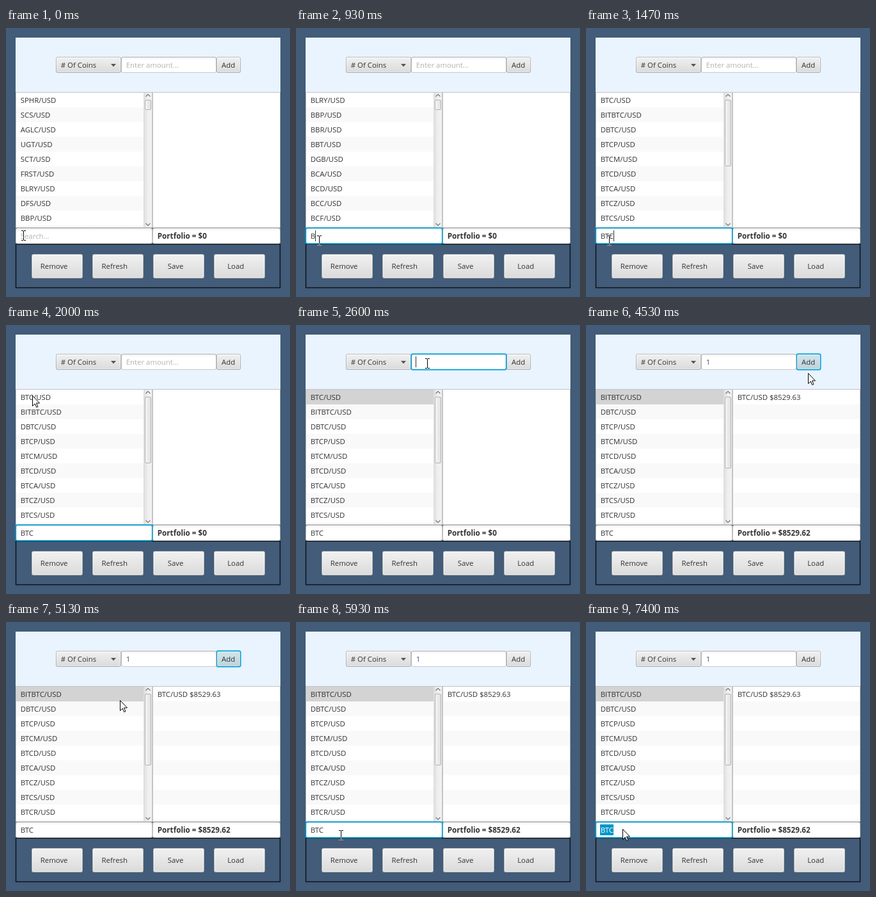
An HTML page with a canvas that plays this animation: 444 px wide and 420 px high, repeating every 8000 ms.

```html
<!DOCTYPE html>
<html lang="en">
<head>
<meta charset="utf-8">
<title>Coin portfolio</title>
<style>
  html, body { margin: 0; width: 100%; height: 100%; overflow: hidden; background: #425c79; }
  canvas { display: block; }
</style>
</head>
<body>
<canvas id="stage" width="444" height="420"></canvas>
<script>
const ctx = document.getElementById('stage').getContext('2d', { alpha: false });
const LOOP = 8000;
const TICKS_PER_MS = 0.015;
const ROW = 23;
const INK = '#333', BLUE = '#039ed3', SELECTED = '#0096c9', FAINT_BLUE = 'rgba(3,158,211,.13)';
const REGULAR = '11.4px "Open Sans", sans-serif';
const BOLD = 'bold 11.7px "Open Sans", sans-serif';

const SEARCH = [15, 312, 214, 25];
const AMOUNT = [180, 45, 149, 25];
const ADD = [329, 45, 38, 25];
const LIST = [15, 100, 214, 212];

// Coin lists by the tick at which they appear, with the scroll thumb height.
const LISTS = [
  [0, 16, 'SPHR SCS AGLC UGT SCT FRST BLRY DFS BBP'],
  [14, 16, 'BLRY BBP BBR BBT DGB BCA BCD BCC BCF'],
  [18, 34, 'BBT BTA BTB BTC BITBTC DBTC BTCP BTCM BTCD'],
  [22, 104, 'BTC BITBTC DBTC BTCP BTCM BTCD BTCA BTCZ BTCS'],
  [68, 112, 'BITBTC DBTC BTCP BTCM BTCD BTCA BTCZ BTCS BTCR'],
];
const QUERY = [[0, ''], [13, 'B'], [18, 'BT'], [22, 'BTC']];
const FOCUS = [[0, ''], [5, 'search'], [32, 'list'], [39, 'amount'], [52, 'add'], [84, 'search']];
const CARET = [[6, 29], [39, 52], [84, 89]];

// Pointer path: tick, x, y.
const PATH = [
  [0, 27, 324], [1, 36, 332], [22, 36, 332], [29, 41, 111], [30, 41, 110], [32, 42, 112],
  [34, 100, 79], [39, 205, 60], [44, 215, 61], [47, 354, 72], [48, 357, 79], [50, 357, 63],
  [51, 357, 61], [55, 357, 61], [61, 347, 75], [68, 347, 75], [77, 178, 122], [80, 138, 232],
  [84, 73, 329], [89, 70, 333], [91, 70, 333], [95, 27, 330], [104, 27, 330],
  [106, 5, 326], [108, 3, 325], [111, 57, 323],
];

const latest = (steps, tick) => steps.filter(step => step[0] <= tick).pop();
const inside = ([x, y, w, h], px, py) => px >= x && px < x + w && py >= y && py < y + h;

function pointerAt(tick) {
  const next = PATH.findIndex(key => key[0] > tick);
  if (next < 0) return PATH[PATH.length - 1].slice(1);
  const [t0, x0, y0] = PATH[next - 1], [t1, x1, y1] = PATH[next];
  const k = (tick - t0) / (t1 - t0);
  return [Math.round(x0 + (x1 - x0) * k), Math.round(y0 + (y1 - y0) * k)];
}

function rect(x, y, w, h, fill) {
  ctx.fillStyle = fill;
  ctx.fillRect(x, y, w, h);
}

function rounded([x, y, w, h], inset, radius, fill) {
  ctx.fillStyle = fill;
  ctx.beginPath();
  ctx.roundRect(x + inset, y + inset, w - 2 * inset, h - 2 * inset, radius);
  ctx.fill();
}

function shade(x0, y0, x1, y1, ...colors) {
  const gradient = ctx.createLinearGradient(x0, y0, x1, y1);
  colors.forEach((color, i) => gradient.addColorStop(i / (colors.length - 1), color));
  return gradient;
}

function text(label, x, y, color = INK, font = REGULAR) {
  ctx.font = font;
  ctx.fillStyle = color;
  ctx.fillText(label, x, y);
}

function line(points, color) {
  ctx.strokeStyle = color;
  ctx.lineWidth = 1.2;
  ctx.beginPath();
  points.forEach(([x, y]) => ctx.lineTo(x, y));
  ctx.stroke();
}

function button(box, focused, top = '#f1f1f1', bottom = '#dadada') {
  const [, y, , h] = box;
  rounded(box, focused ? -0.4 : 0, 3, focused ? BLUE : shade(0, y, 0, y + h, '#bdbdbd', '#a9a9a9'));
  rounded(box, 1, 2, shade(0, y, 0, y + h, '#fdfdfd', '#e9e9e9'));
  rounded(box, 2, 2, shade(0, y, 0, y + h, top, bottom));
  if (focused) rounded(box, -1.4, 4, FAINT_BLUE);
}

function field(box, focused) {
  const [x, y, w, h] = box;
  rounded(box, focused ? -0.4 : 0, 3, focused ? BLUE : shade(0, y, 0, y + h, '#b5b5b5', '#c8c8c8'));
  rounded(box, 1, 2, shade(0, y, 0, y + 5, '#ededed', '#fff'));
  if (focused) {
    rounded(box, -1.4, 4, FAINT_BLUE);
    rounded([x, y, w, h], 2, 1, '#fff');
  }
}

function input(box, value, prompt, focused, caretOn, selected, color) {
  const [x, y] = box, left = x + 7.7, baseline = y + 17;
  field(box, focused);
  ctx.font = REGULAR;
  const width = ctx.measureText(value).width;
  if (selected) rect(22, y + 4, Math.round(left + width) - 22, 17, SELECTED);
  if (value) text(value, left, baseline, selected ? '#fff' : color);
  else if (!focused) text(prompt, left, baseline, '#b2b2b2');
  if (focused && caretOn) rect(Math.round(left + width - 0.3), y + 4, 1, 17, INK);
}

function listFrame([x, y, w, h], focused) {
  if (focused) {
    rounded([x, y, w, h], -1.4, 1, FAINT_BLUE);
    rounded([x, y, w, h], -0.3, 0, BLUE);
  } else rect(x, y, w, h, '#c4c4c4');
  rect(x + 1, y + 1, w - 2, h - 2, '#fff');
}

function stripes(x, width) {
  for (let i = 1; i < 10; i += 2) rect(x, 101 + i * ROW, width, Math.min(ROW, 210 - i * ROW), '#f9f9f9');
}

function scrollBar(thumbHeight) {
  rect(215, 101, 13, 210, shade(215, 0, 228, 0, '#dcdcdc', '#efefef', '#f2f2f2'));
  line([[218.5, 107], [222, 103.5], [225.5, 107]], '#777');
  line([[218.5, 305], [222, 308.5], [225.5, 305]], '#777');
  const thumb = [217, 112, 10, thumbHeight];
  rounded(thumb, 0, 2.5, '#b4b4b4');
  rounded(thumb, 1, 1.5, shade(217, 0, 227, 0, '#f7f7f7', '#dedede'));
}

function coinList(tick, focused) {
  const [, thumbHeight, coins] = latest(LISTS, tick);
  const hasSelection = tick >= 32;
  listFrame(LIST, focused);
  stripes(16, 199);
  if (hasSelection) rect(16, 101, 199, ROW, focused ? SELECTED : '#d3d3d3');
  coins.split(' ').forEach((coin, i) =>
    text(coin + '/USD', 22.7, 117 + i * ROW, focused && hasSelection && i === 0 ? '#fff' : INK));
  scrollBar(thumbHeight);
}

function pointer(tick) {
  const [x, y] = pointerAt(tick);
  const overField = inside(SEARCH, x, y) || inside(AMOUNT, x, y);
  ctx.save();
  if (overField && tick < 105) {
    // The text pointer inverts whatever lies below it.
    ctx.globalCompositeOperation = 'difference';
    for (const end of [y - 8, y + 7]) {
      rect(x - 3, end, 3, 1, '#fff');
      rect(x + 1, end, 3, 1, '#fff');
    }
    rect(x, y - 7, 1, 14, '#fff');
  } else {
    ctx.translate(x, y);
    const arrow = new Path2D('M.5 .5V16.5L4.2 13L6.7 18.5L8.9 17.6L6.5 12H11.5Z');
    ctx.fillStyle = '#fff';
    ctx.fill(arrow);
    ctx.strokeStyle = '#000';
    ctx.lineWidth = 1;
    ctx.stroke(arrow);
  }
  ctx.restore();
}

function draw(tick) {
  const focus = latest(FOCUS, tick)[1];
  const caretOn = CARET.some(([from, to]) => tick >= from && tick < to);
  const added = tick >= 68;

  rect(0, 0, 444, 420, '#425c79');
  rect(15, 15, 414, 85, '#e9f4ff');

  button([78, 45, 102, 25]);
  text('# Of Coins', 85.7, 62);
  ctx.fillStyle = '#555';
  ctx.fill(new Path2D('M164 56H172L168 60.5Z'));

  const addShade = tick >= 52 && !added ? ['#dedede', '#cbcbcb']
    : tick >= 48 && tick < 52 ? ['#f8f8f8', '#e6e6e6'] : [];
  button(ADD, focus === 'add', ...addShade);
  text('Add', 337, 62);
  input(AMOUNT, tick >= 45 ? '1' : '', 'Enter amount...', focus === 'amount', caretOn, false, '#3b5580');

  listFrame([229, 100, 200, 212]);
  if (added) {
    stripes(230, 198);
    text('BTC/USD $8529.63', 236.7, 117);
  }
  coinList(tick, focus === 'list');

  ctx.strokeStyle = '#0c1118';
  ctx.lineWidth = 1.4;
  ctx.strokeRect(15.5, 337.5, 413, 68);
  [['Remove', 53.7], ['Refresh', 149.5], ['Save', 252.7], ['Load', 346.2]].forEach(([label, x], i) => {
    button([40 + i * 95, 353, 80, 38]);
    text(label, x, 376);
  });

  field([229, 312, 200, 25]);
  text('Portfolio = $' + (added ? '8529.62' : '0'), 236.7, 329, INK, BOLD);
  input(SEARCH, latest(QUERY, tick)[1], 'Search...', focus === 'search', caretOn, tick >= 94, INK);

  pointer(tick);
}

const start = performance.now();
function frame() {
  const time = (performance.now() - start) % LOOP;
  draw(Math.floor((time + 4) * TICKS_PER_MS) % (LOOP * TICKS_PER_MS));
  requestAnimationFrame(frame);
}
frame();
</script>
</body>
</html>
```
